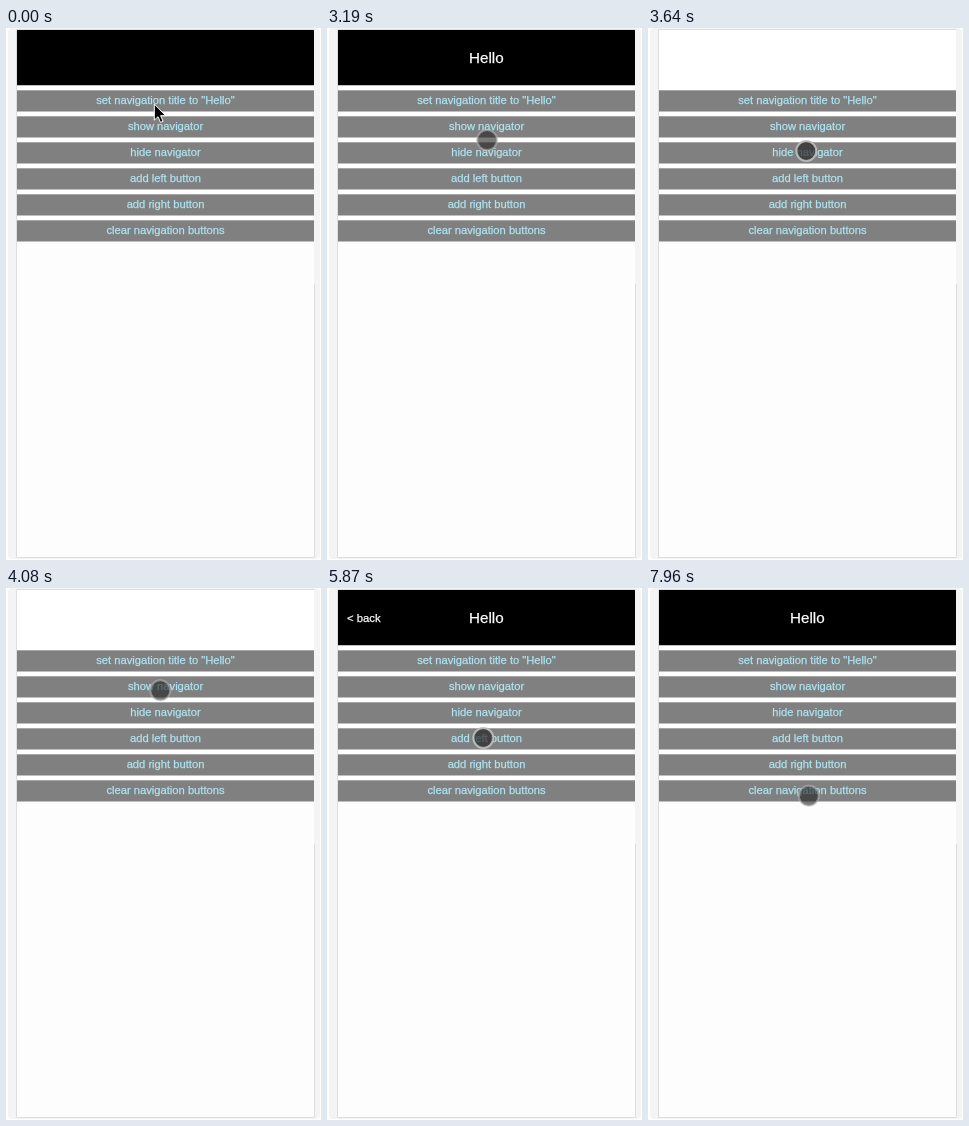
An HTML page that plays this animation: 315x532 px, repeating every 8 s.

```html
<!DOCTYPE html>
<html lang="en">
<head>
<meta charset="utf-8">
<title>Navigation bar demo</title>
<style>
  html, body { margin: 0; width: 100%; height: 100%; overflow: hidden; background: #fff; }
  svg { display: block; width: 100vw; height: 100vh; }
  text { font-family: "Liberation Sans", Arial, sans-serif; stroke-width: .25; }
  #rows text { font-size: 11.2px; fill: #ade3f0; stroke: #ade3f0; text-anchor: middle; }
  #bar text { fill: #fff; stroke: #fff; }
  #title { font-size: 15.2px; text-anchor: middle; }
  .side { font-size: 11.3px; }
</style>
</head>
<body>
<svg viewBox="0 0 315 532" xmlns="http://www.w3.org/2000/svg">
  <rect width="315" height="532" fill="#fff"/>
  <rect x="2" width="312" height="531" rx="4" fill="#f4f4f4"/>
  <rect x="11" y="2" width="297" height="527" fill="#fdfdfd"/>
  <path d="M308.5 256V529.5H10.5V1.5H308.5" fill="none" stroke="#dedede"/>
  <rect x="11" y="2" width="297" height="212" fill="#fff"/>
  <g id="bar">
    <rect x="11" y="2" width="297" height="55.25"/>
    <text id="title" x="159.4" y="35">Hello</text>
    <text id="left" class="side" x="20" y="33.5">&lt; back</text>
    <text id="right" class="side" x="298.5" y="33.5" text-anchor="end">next &gt;</text>
  </g>
  <g id="rows"></g>
  <path id="arrow" d="M0 0V16.2L3.7 12.7L6.2 18.4L8.8 17.3L6.3 11.7H11.4Z"
        transform="translate(148.3 76)" stroke="#fff"/>
  <g id="touch">
    <circle id="disc" r="10.2" fill="#222"/>
    <circle id="ring" r="10" fill="none" stroke="#c0c0c0" stroke-width="2"/>
  </g>
</svg>
<script>
const LOOP = 8000;
const FIRST_TAP = 500;
const STEP = 149.2; // the screen refreshes in coarse steps
const $ = id => document.getElementById(id);

const labels = ['set navigation title to "Hello"', 'show navigator', 'hide navigator',
  'add left button', 'add right button', 'clear navigation buttons'];

function add(parent, tag, attrs, content = '') {
  const el = document.createElementNS('http://www.w3.org/2000/svg', tag);
  for (const key in attrs) el.setAttribute(key, attrs[key]);
  el.textContent = content;
  parent.append(el);
}

const rowY = row => 62.3 + 26 * row;

labels.forEach((label, row) => {
  add($('rows'), 'rect', { x: 11, y: rowY(row), width: 297, height: 21.2, fill: '#808080' });
  add($('rows'), 'text', { x: 159.5, y: rowY(row) + 13.7 }, label);
});

// The finger leaves at step `from`, glides for `steps` and rests on a button.
const glides = [
  { from: 4, steps: 2, x: 162.3, y: 98.5, held: true },
  { from: 17, steps: 3, x: 158.3, y: 123, held: true },
  { from: 22, steps: 2, x: 154.3, y: 102.3 },
  { from: 31, steps: 2, x: 156.3, y: 150, held: true },
  { from: 37, steps: 3, x: 155.5, y: 172.5, held: true },
  { from: 43, steps: 3, x: 160.8, y: 207.8 }
];

const easeOut = p => 1 - (1 - p) ** 2;

function touchAt(step) {
  const touch = { x: 149, y: 79, held: true };
  for (const glide of glides) {
    const p = Math.min(1, (step - glide.from) / glide.steps);
    if (p <= 0) break;
    touch.x += (glide.x - touch.x) * easeOut(p);
    touch.y += (glide.y - touch.y) * easeOut(p);
    touch.held = p === 1 && glide.held;
  }
  return touch;
}

const show = (id, on) => $(id).setAttribute('visibility', on ? 'inherit' : 'hidden');

function draw(t) {
  const step = Math.floor((t - FIRST_TAP) / STEP + 0.1);
  const started = t >= FIRST_TAP;
  show('title', started);
  show('bar', t < 3640 || t >= 4530);
  show('left', t >= 5720 && t < 7810);
  show('right', t >= 6760 && t < 7810);
  show('arrow', !started);
  show('touch', started);

  const { x, y, held } = touchAt(step);
  $('touch').setAttribute('transform', `translate(${x} ${y})`);
  $('disc').setAttribute('fill-opacity', held ? 0.67 : 0.6);
  $('ring').setAttribute('stroke-opacity', held ? 0.9 : 0.55);
}

const start = performance.now();
function tick() {
  draw((performance.now() - start) % LOOP);
  requestAnimationFrame(tick);
}
tick();
</script>
</body>
</html>
```
